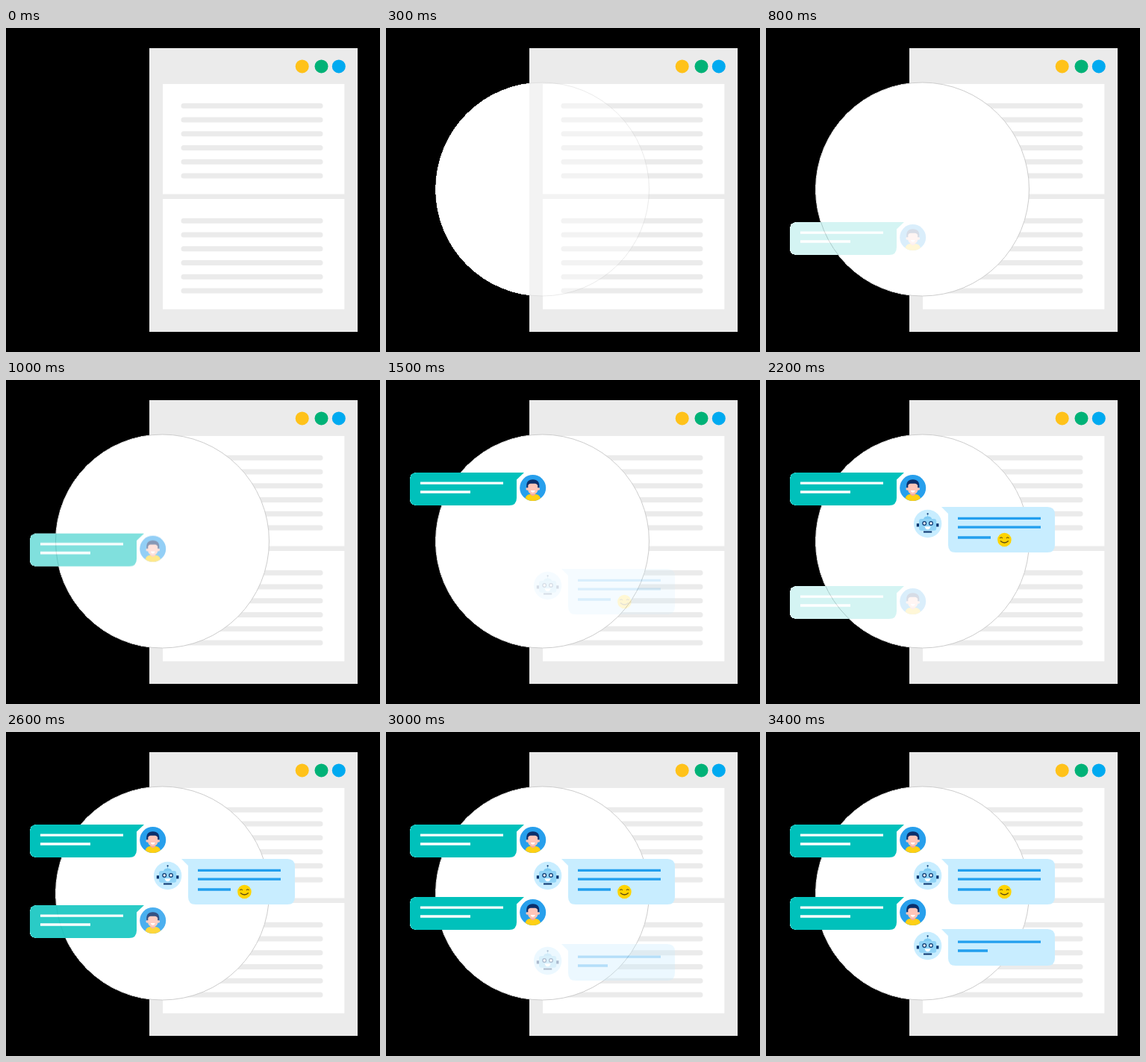
Write an HTML page that moves like this. It is 501 px wide and 434 px high and loops after 8400 ms.

```html
<!DOCTYPE html>
<html lang="en">
<head>
<meta charset="utf-8">
<title>Chat preview</title>
<style>
  html, body { margin: 0; width: 100%; height: 100%; overflow: hidden; background: #000; }
  svg { display: block; width: 501px; height: 434px; }
</style>
</head>
<body>
<svg viewBox="0 0 501 434">
  <defs>
    <path id="tealShape" d="M41 124H185L175 133.5V158Q175 168 165 168H41Q32 168 32 159V133Q32 124 41 124Z"/>
    <clipPath id="face"><circle cx="196.7" cy="144.5" r="17.5"/></clipPath>

    <g id="question">
      <use href="#tealShape" fill="#00c1bb"/>
      <path d="M46 138.2H157M46 150H113" stroke="#fff" stroke-width="3.3"/>
      <circle cx="196.7" cy="144.5" r="17.5" fill="#279fec"/>
      <g clip-path="url(#face)">
        <path d="M186 163Q186 153.5 193 153H200.500Q207.500 153.500 207.500 163Z" fill="#ffd014"/>
        <path d="M193.300 149H200.200V153Q196.700 157.500 193.300 153Z" fill="#f5a99b"/>
        <g fill="#ffc5b8">
          <circle cx="189.300" cy="145.800" r="1.900"/>
          <circle cx="204.200" cy="145.800" r="1.900"/>
          <path d="M190 138H203.500V146.500Q203 153 196.700 153Q190.500 153 190 146.500Z"/>
        </g>
        <path d="M188.400 144.300Q187 133.500 196.700 133.300Q206.500 133.500 205.200 144.300H203.200V141Q202 139 200 138.700H193.500Q191 139 190.300 141V144.300Z" fill="#0b2f6b"/>
        <path d="M193.700 148H199.800Q199 150.700 196.700 150.700Q194.500 150.700 193.700 148Z" fill="#fff"/>
      </g>
    </g>

    <g id="robot">
      <circle cx="216.600" cy="192.500" r="18.700" fill="#c8edff"/>
      <path d="M216.600 180V184" stroke="#7fcbf3"/>
      <circle cx="216.600" cy="179.300" r="1.100" fill="#06346f"/>
      <path d="M211 187Q211 182.700 216.600 182.700Q222.200 182.700 222.200 187Z" fill="#7fcbf3"/>
      <path d="M201.800 192.300H206V196.600H201.800ZM227.200 192.300H231.400V196.600H227.200Z" fill="#06346f"/>
      <rect x="205" y="186" width="23.200" height="15.800" rx="3" fill="#90d3f6"/>
      <g fill="#fff" stroke="#06346f" stroke-width="1.200">
        <circle cx="212.200" cy="192" r="2.300"/>
        <circle cx="221" cy="192" r="2.300"/>
      </g>
      <path d="M212.700 196.300H220.500Q219.800 200.300 216.600 200.300Q213.400 200.300 212.700 196.300Z" fill="#fff"/>
      <path d="M211 203.500H222.200" stroke="#06346f" stroke-width="2"/>
    </g>

    <g id="longReply">
      <use href="#robot"/>
      <path d="M235 170H377Q387 170 387 180V221Q387 231 377 231H254Q244 231 244 221V179Z" fill="#c8edff"/>
      <path d="M257 185.400H368M257 197.200H368M257 211H301" stroke="#229fee" stroke-width="3.300"/>
      <circle cx="319.400" cy="214" r="9.300" fill="#ffd400"/>
      <path d="M313.300 212Q315 209.500 316.800 212M322 212Q323.800 209.500 325.500 212M314 215.500Q319.400 220.500 324.800 215.500" fill="none" stroke="#5c4a10" stroke-width="1.200"/>
    </g>

    <g id="shortReply">
      <use href="#robot" y="94"/>
      <path d="M235 264H377Q387 264 387 274V303Q387 313 377 313H254Q244 313 244 303V273Z" fill="#c8edff"/>
      <path d="M257 281.200H368M257 293H297" stroke="#229fee" stroke-width="3.300"/>
    </g>
  </defs>

  <!-- opaque white backing keeps fading parts solid over the black -->
  <g fill="#fff" shape-rendering="crispEdges">
    <circle id="lensBack" cx="209.500" cy="216" r="143.300"/>
    <use id="ask1Back" href="#tealShape"/>
    <g transform="translate(0 97)"><use id="ask2Back" href="#tealShape"/></g>
  </g>

  <path d="M192 27H471V407H192Z" fill="#ebebeb"/>
  <path d="M210 75H453.300V222.500H210ZM210 229H453.300V376.700H210Z" fill="#fff"/>
  <g id="lines" stroke="#ebebeb" stroke-width="7" stroke-linecap="round"></g>
  <circle cx="396.700" cy="51.400" r="9" fill="#ffc21a"/>
  <circle cx="422.500" cy="51.400" r="9" fill="#00b277"/>
  <circle cx="445.800" cy="51.400" r="9" fill="#00aaf0"/>

  <circle id="lens" cx="209.500" cy="216" r="143" fill="#fff" stroke="#ccc" stroke-width="1"/>
  <use id="ask1" href="#question"/>
  <use id="reply1" href="#longReply"/>
  <g transform="translate(0 97)"><use id="ask2" href="#question"/></g>
  <use id="reply2" href="#shortReply"/>
</svg>

<script>
const LOOP = 8400, STEP = 100;
const byId = id => document.getElementById(id);

const lines = byId('lines');
for (const top of [104.3, 258.3]) {
  for (let i = 0; i < 6; i++) {
    const line = document.createElementNS(lines.namespaceURI, 'path');
    line.setAttribute('d', `M238 ${top + i * 18.75}H421`);
    lines.append(line);
  }
}

// Holds `from`, moves to `to` in equal jumps after `start`, then holds `to`.
function stepped(el, from, to, start, count) {
  const begin = start - 1; // keeps each jump just ahead of its mark
  el.animate([
    { ...from, offset: 0 },
    { ...from, offset: begin / LOOP, easing: `steps(${count}, end)` },
    { ...to, offset: (begin + count * STEP) / LOOP },
    { ...to, offset: 1 }
  ], { duration: LOOP, iterations: Infinity });
}

const fade = (el, start, count) => stepped(el, { opacity: 0 }, { opacity: 1 }, start, count);
const rise = (el, dy, start, count) =>
  stepped(el, { transform: `translateY(${dy}px)` }, { transform: 'translateY(0px)' }, start, count);

// id, start, jumps, rise in px
const parts = [
  ['lens', 100, 5, 0],
  ['ask1', 700, 6, 163.2],
  ['reply1', 1400, 6, 99.6],
  ['ask2', 2100, 6, 66],
  ['reply2', 2800, 6, 30]
];

for (const [id, start, count, dy] of parts) {
  const part = byId(id), back = byId(id + 'Back');
  fade(part, start, count);
  rise(part, dy, start, count);
  if (back) {
    fade(back, start, 1);
    rise(back, dy, start, count);
  }
}
</script>
</body>
</html>
```
